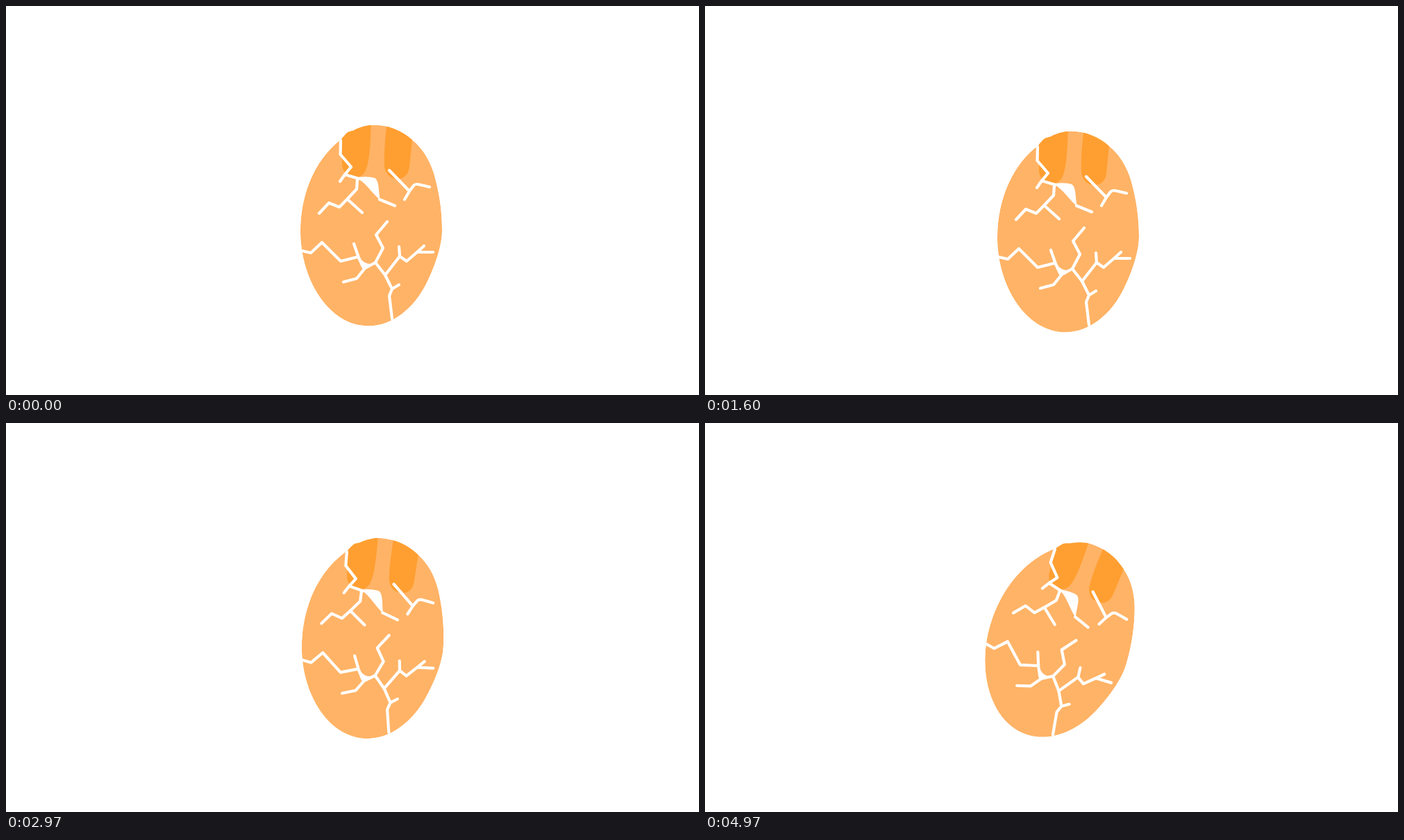
Recreate the animation shown at these times as an HTML page. Size 998 px wide and 561 px high, loop 5.01 s.

```html
<!DOCTYPE html>
<html lang="en">
<head>
<meta charset="utf-8">
<title>Wobbling egg</title>
<style>
  html, body { margin: 0; width: 100%; height: 100%; overflow: hidden; background: #fff; }
  svg { display: block; width: 100%; height: 100%; }
  .crack { fill: none; stroke: #fff; stroke-width: 4.2; stroke-linecap: round; stroke-linejoin: round; }
</style>
</head>
<body>
<svg viewBox="0 0 998 561">
  <defs>
    <clipPath id="shell">
      <path id="outline" d="M483 192C486 188 488 186 491 183C494 180 499 181 503 178C512 174 521 171.5 530 171.5C551 172 569 179 585 193C600 205 610 222 616 241C624 268 628 296 628 324C628 345 618 375 606 399C588 436 556 461.5 522 461.5C465 461.5 424 394 424 325C424 268 447 219 483 192Z"/>
    </clipPath>
  </defs>
  <g id="egg">
    <g clip-path="url(#shell)">
      <use href="#outline" fill="#ffb366"/>
      <g fill="#ff9f31">
        <path d="M483 165H526L525 190C524 207 523 225 518 237C514 246 506 248 498 246C490 244 485 238 484 230Z"/>
        <path d="M549 165C546 190 544 214 545 232C547 244 556 250 565 249C574 249 580 242 581 232C582 222 584 205 586 180V165Z"/>
      </g>
      <g class="crack">
        <path d="M482 194L481.500 214L497 232L488 243L481 253M488 243L508 249M538 279L560 288"/>
        <path d="M506 250L505 264L491 279L480 290L465 284L451 299M492 279L513 298"/>
        <path d="M552 237L581 267M574 279L581 267L587 259Q590 256 595 257.500L610 261"/>
        <path d="M426 353L439 356L455 341L482 368L506 362M501 343L508 363L514 376"/>
        <path d="M486 398L505 393L517 378L532 370L543 349L533 330L549 311"/>
        <path d="M532 370L546 388L556 408L552 418L556 451M556 408L566 402"/>
        <path d="M546 388L567 361L566 347M567 361L577 368L592 355L602 346M592 355L615 355"/>
      </g>
      <path fill="#fff" d="M507 247Q522 245 531 248C538 252 536 268 539 280C527 270 520 257 507 249ZM507 361L514 380L520 379L532 371Q516 375 509 362Z"/>
    </g>
  </g>
</svg>
<script>
const egg = document.getElementById('egg');
const LOOP = 5010, STEP = 100 / 3, LAST = 149;

// time (s), centre x, centre y, tilt (deg)
const poses = [
  [0, 526, 316, 0],
  [0.25, 539, 309.5, -2],
  [0.53, 526, 313, 4],
  [0.8, 498, 315, 13],
  [1.07, 526, 314, -3],
  [1.167, 531.9, 313.8, -6.1],
  [1.4, 528, 321, -4],
  [1.6, 523, 325, 0],
  [1.85, 530, 320, 1],
  [2.033, 533.5, 315.6, -0.2],
  [2.13, 530, 318, 1],
  [2.42, 508, 321, 9],
  [2.67, 516, 322, 5],
  [2.967, 528.4, 310, 3],
  [3.2, 524, 309.5, 4],
  [3.45, 507, 312, 9],
  [3.733, 528.3, 317.8, -4.5],
  [3.9, 524, 323, 0],
  [4.1, 540, 328, -1],
  [4.233, 540.1, 327.7, -2.3],
  [4.4, 545, 326, -3],
  [4.6, 530, 320, 6],
  [4.8, 512.5, 313, 15],
  [4.967, 511, 311.7, 16.7]
];

function slope(i, k) {
  const a = poses[Math.max(i - 1, 0)];
  const b = poses[Math.min(i + 1, poses.length - 1)];
  return (b[k] - a[k]) / (b[0] - a[0]);
}

// Cubic Hermite blend between neighbouring poses
function poseAt(t) {
  let i = 0;
  while (i < poses.length - 2 && t > poses[i + 1][0]) i++;
  const a = poses[i], b = poses[i + 1], span = b[0] - a[0];
  const u = Math.min((t - a[0]) / span, 1), v = 1 - u;
  return [1, 2, 3].map(k =>
    v * v * (1 + 2 * u) * a[k] + u * u * (3 - 2 * u) * b[k] +
    span * u * v * (v * slope(i, k) - u * slope(i + 1, k)));
}

function draw(now) {
  const frame = Math.min(LAST, Math.floor((now % LOOP + 5) / STEP));
  const [x, y, tilt] = poseAt(frame * STEP / 1000);
  egg.setAttribute('transform', `translate(${x} ${y}) rotate(${tilt}) translate(-526 -316)`);
}

let start;
function tick(now) {
  start ??= now;
  draw(now - start);
  requestAnimationFrame(tick);
}
draw(0);
requestAnimationFrame(tick);
</script>
</body>
</html>
```
